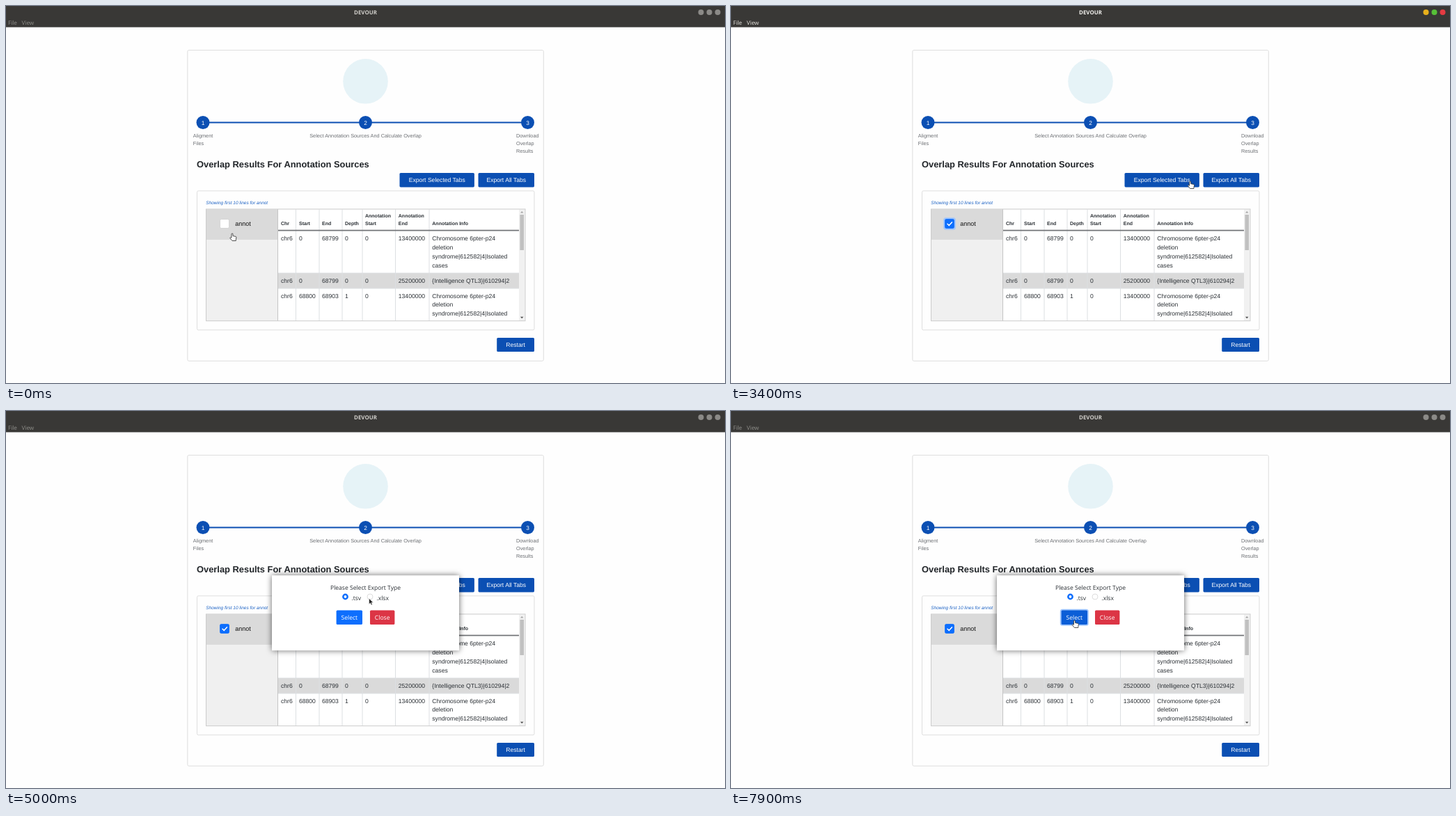
An HTML page that plays this animation: 1033x542 px, repeating every 8 s.

```html
<!DOCTYPE html>
<html lang="en">
<head>
<meta charset="utf-8">
<title>DEVOUR</title>
<style>
html, body { margin: 0; width: 100%; height: 100%; overflow: hidden; background: #fefefe; }
svg { display: block; width: 1033px; height: 542px; }
text { font-family: "Liberation Sans", Arial, sans-serif; text-rendering: geometricPrecision; white-space: pre; }
.ui { font-family: Ubuntu, "Open Sans", sans-serif; }
.b { font-weight: bold; }
.i { font-style: italic; }
.mid { text-anchor: middle; }
#dialog { filter: drop-shadow(0 0 4px rgba(0, 0, 0, .6)); }
</style>
</head>
<body>
<svg id="stage" viewBox="0 0 1033 542"></svg>
<script>
const LOOP = 8000, STEP = 100;
const BLUE = '#0b4fb3', BRIGHT = '#0d6efd', INK = '#2b3035', GREY = '#6c6f73';

const rect = (x, y, w, h, fill, extra = '') =>
  `<rect x="${x}" y="${y}" width="${w}" height="${h}" fill="${fill}" ${extra}/>`;
const circle = (x, y, r, fill, extra = '') =>
  `<circle cx="${x}" cy="${y}" r="${r}" fill="${fill}" ${extra}/>`;
const line = (x1, y1, x2, y2, color, w = 1) =>
  `<path d="M${x1} ${y1}L${x2} ${y2}" stroke="${color}" stroke-width="${w}"/>`;
const text = (x, y, str, size = 8.61, fill = INK, cls = '') =>
  `<text x="${x}" y="${y}" font-size="${size}" fill="${fill}" class="${cls}">${str}</text>`;
const lines = (x, y, list, gap, ...style) =>
  list.map((s, i) => text(x, y + i * gap, s, ...style)).join('');
const button = (x, y, w, h, label, fill, cls = '') =>
  rect(x, y, w, h, fill, 'rx="1.6"') + text(x + w / 2, y + h / 2 + 3.1, label, 8.61, '#fff', 'mid ' + cls);
const ring = (x, y, w, h, rx = 2.5) =>
  rect(x, y, w, h, 'none', `rx="${rx}" stroke="#9ec5fe" stroke-width="2"`);
// Visible only during the given "from-to" spans, in ms
const during = (spans, content) => `<g data-on="${spans}">${content}</g>`;

function windowBar() {
  const dots = colors => colors.map((c, i) => circle(998.5 + i * 12, 9, 4, c)).join('');
  const menu = color => text(3, 27, 'File', 8.2, color, 'ui') + text(22.5, 27, 'View', 8.2, color, 'ui');
  const title = color => text(516.5, 11.6, 'DEVOUR', 7.9, color, 'ui b mid');
  return rect(0, 0, 1033, 30.5, '#393836') +
    during('0-1500 4200-8000', title('#d2d0cc') + menu('#8f8e8a') + dots(Array(3).fill('#8b8a87'))) +
    during('1500-4200', title('#f4f3f0') + menu('#e4e2dd') + dots(['#e8b01c', '#56c038', '#e63b42']));
}

function steps() {
  const xs = [283, 516.5, 749.5];
  return line(283, 167.5, 749.5, 167.5, BLUE, 2) +
    xs.map((x, i) => circle(x, 167.5, 9.5, BLUE) + text(x, 170.5, i + 1, 8.4, '#fff', 'mid')).join('') +
    lines(268.8, 188.6, ['Aligment', 'Files'], 11, 7.32, GREY) +
    text(516.5, 188.6, 'Select Annotation Sources And Calculate Overlap', 7.32, GREY, 'mid') +
    lines(733, 188.6, ['Download', 'Overlap', 'Results'], 11, 7.32, GREY);
}

function table() {
  const cols = [395, 421, 454, 487, 516, 563.8, 612.3];
  const heads = ['Chr', 'Start', 'End', 'Depth', 'Annotation|Start', 'Annotation|End', 'Annotation Info'];
  const syndrome = 'Chromosome 6pter-p24|deletion|syndrome|612582|4|Isolated'.split('|');
  const info = [syndrome[0], syndrome[1], syndrome.slice(2).join('|')];
  const rows = [
    [336.9, ['chr6', '0', '68799', '0', '0', '13400000'], [...info, 'cases']],
    [397.6, ['chr6', '0', '68799', '0', '0', '25200000'], ['{Intelligence QTL3}|610294|2']],
    [419.5, ['chr6', '68800', '68903', '1', '0', '13400000'], info],
  ];
  let out = rect(391, 292.5, 346, 160, '#fff') + rect(391, 384, 346, 22, '#dadada');
  for (const x of [416.5, 450, 483, 512, 559.5, 608]) out += line(x, 292.5, x, 452.5, '#dcdfe2');
  out += line(391, 384, 737, 384, '#dcdfe2') + line(391, 406, 737, 406, '#dcdfe2');
  out += line(391, 322.6, 737, 322.6, '#737578', 1.8);
  heads.forEach((h, i) => {
    const parts = h.split('|');
    out += lines(cols[i], 314.7 - (parts.length - 1) * 10.4, parts, 10.4, 7, INK, 'b');
  });
  for (const [y, cells, notes] of rows) {
    cells.forEach((c, i) => out += text(cols[i], y, c));
    out += lines(cols[6], y, notes, 12.9);
  }
  return out;
}

function scrollbar() {
  return rect(737, 292.5, 8.5, 160, '#f1f1f1') + rect(738.4, 300, 5.6, 51, '#c1c1c1') +
    '<path d="M739 297.4l2.2-2.4 2.2 2.4z" fill="#a3a3a3"/><path d="M739 446.8l2.2 2.4 2.2-2.4z" fill="#505050"/>';
}

function checkbox() {
  const box = (fill, stroke) => rect(307.5, 306.5, 13, 13, fill, `rx="1.8" stroke="${stroke}" stroke-width=".8"`);
  return during('1500-4000', ring(306.2, 305.2, 15.6, 15.6)) +
    during('0-1500', box('#fff', '#cfcfcf')) +
    during('1500-1600', box('#e8e8e8', '#86b7fe')) +
    during('1600-8000', box(BRIGHT, BRIGHT) +
      '<path d="M311 313.3l2.2 2.3 4.2-4.7" fill="none" stroke="#fff" stroke-width="1.5" stroke-linecap="round" stroke-linejoin="round"/>');
}

function page() {
  const frame = 'rx="2" stroke="#dedede"';
  return rect(260.8, 63.5, 511.5, 446.8, '#fefefe', frame) +
    circle(516.5, 108.3, 32.3, '#e6f3f7') + steps() +
    text(274, 231.8, 'Overlap Results For Annotation Sources', 12.88, '#212529', 'b') +
    during('4000-4300', ring(564.6, 239.1, 109.2, 22.2)) +
    button(565.5, 240, 107.4, 20.4, 'Export Selected Tabs', BLUE) +
    button(678.5, 240, 80.5, 20.4, 'Export All Tabs', BLUE) +
    rect(274.5, 265.8, 484.5, 200, '#fefefe', frame) +
    text(287.3, 285, 'Showing first 10 lines for annot', 6.5, '#1c62c4', 'i') +
    rect(287.5, 292.5, 103, 160, '#f0f0f0') + rect(287.5, 292.5, 103, 43.5, '#dadada') +
    checkbox() + text(329.2, 316, 'annot', 9, '#111') +
    table() + scrollbar() + line(390.5, 292, 390.5, 453, '#c4c4c4') +
    rect(287.5, 292, 458.5, 160.7, 'none', 'stroke="#cbcbcb"') +
    button(705.2, 477, 53.8, 20, 'Restart', BLUE);
}

function radio(x, checkedSpans, plainSpans, focusSpans) {
  return during(focusSpans, circle(x, 267, 5.6, 'none', 'stroke="#9ec5fe" stroke-width="1.8"')) +
    during(plainSpans, circle(x, 267, 4, '#fff', 'stroke="#cfcfcf" stroke-width=".7"')) +
    during(checkedSpans, circle(x, 267, 4.4, BRIGHT) + circle(x, 267, 1.9, '#fff'));
}

function dialog() {
  const select = fill => button(474.6, 286.6, 37.4, 20.4, 'Select', fill, 'ui');
  return during('4300-8000',
    `<g id="dialog">${rect(382, 236.3, 269, 108, '#fff')}</g>` +
    text(516.5, 257, 'Please Select Export Type', 8.55, INK, 'ui mid') +
    radio(487.5, '0-6100 6800-8000', '6100-6800', '6700-7900') +
    radio(523, '6100-6800', '0-6100 6800-8000', '6000-6700') +
    text(496.5, 272.2, '.tsv', 8.5, INK, 'ui') + text(532.5, 272.2, '.xlsx', 8.5, INK, 'ui') +
    during('7900-8000', ring(473.8, 285.8, 39, 22)) +
    during('0-7200', select(BRIGHT)) + during('7200-8000', select('#0b5ed7')) +
    button(523, 286.6, 35.4, 20.4, 'Close', '#dc3545', 'ui'));
}

function pointer() {
  const hand = '<path d="M-1 1a1 1 0 0 1 2 0v2.6l4 .8q1 .3.9 1.3l-.6 3.2v1.6h-5.3l-3.3-4q.2-1.6 2.3-.3z" fill="#fff" stroke="#333" stroke-width=".85"/>';
  const arrow = '<path d="M0 0V8.2L2 6.4 3.3 9.4 4.8 8.7 3.5 5.9 6 5.7Z" fill="#262626" stroke="#fff" stroke-width=".5"/>';
  return '<g id="pointer">' + during('0-600 2000-2200 2600-4100 7200-8000', hand) +
    during('600-2000 2200-2600 4100-7200', arrow) + '</g>';
}

// Pointer path: time, x, y
const path = [
  [0, 325, 327], [300, 325, 327], [700, 315, 317], [800, 314.5, 316.5],
  [1900, 314.5, 316.5], [2100, 296, 324], [2300, 330, 315], [2600, 627.5, 256], [2700, 652, 255],
  [2800, 652, 255], [3100, 701, 252], [3200, 701, 252], [3500, 639, 252],
  [4000, 639, 252], [4100, 638.5, 253], [4600, 638.5, 253], [5000, 521.5, 269.5],
  [5100, 512, 271], [5500, 522.5, 267], [6200, 522.5, 267], [6600, 485.5, 267],
  [6900, 485.5, 267], [7300, 505, 300], [7400, 505, 300], [7600, 493.5, 301], [LOOP, 493.5, 301],
];

function pointerAt(t) {
  const i = path.findIndex(k => k[0] > t);
  const [t0, x0, y0] = path[i - 1], [t1, x1, y1] = path[i];
  const p = (t - t0) / (t1 - t0);
  return [x0 + (x1 - x0) * p, y0 + (y1 - y0) * p];
}

const stage = document.getElementById('stage');
stage.innerHTML = windowBar() + page() + dialog() + pointer();
const cursor = document.getElementById('pointer');
const timed = [...stage.querySelectorAll('[data-on]')].map(el => ({
  el, spans: el.dataset.on.split(' ').map(s => s.split('-').map(Number)),
}));

function draw(t) {
  for (const { el, spans } of timed)
    el.style.display = spans.some(([a, b]) => t >= a && t < b) ? '' : 'none';
  cursor.setAttribute('transform', `translate(${pointerAt(t)})`);
}

function tick() {
  draw(Math.floor(performance.now() % LOOP / STEP) * STEP);
  requestAnimationFrame(tick);
}
tick();
</script>
</body>
</html>
```
